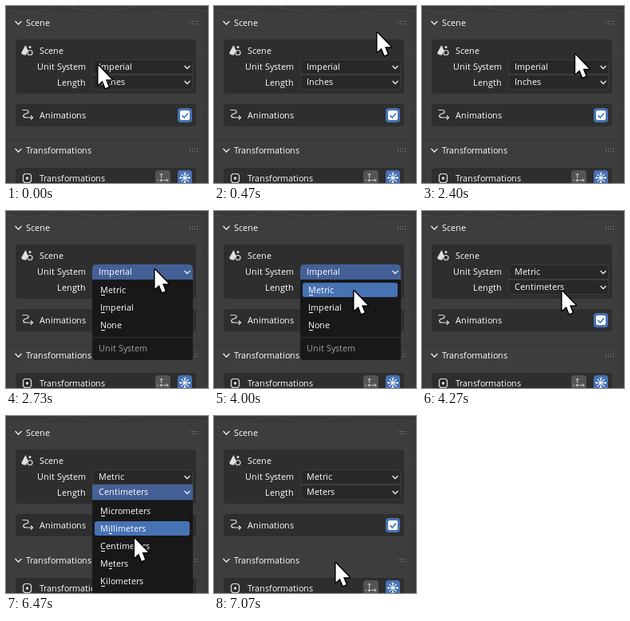
Recreate the animation shown at these times as an HTML page with a canvas. Size 253 by 222 pixels, loop 8000 ms.

```html
<!DOCTYPE html>
<html>
<head>
<meta charset="utf-8">
<style>
html, body { margin: 0; width: 100%; height: 100%; overflow: hidden; background: #393939; }
canvas { display: block; }
</style>
</head>
<body>
<canvas id="stage" width="253" height="222"></canvas>
<script>
const c = document.getElementById('stage').getContext('2d');
const LOOP = 8000, TICK = 1000 / 15;
const BLUE = '#4772b3', TEXT = '#fff', ICON = '#e0e0e0';

// Pointer moves: first tick, last tick, from, to
const moves = [
  [0, 7, [115, 74], [204, 33]],
  [28, 41, [204, 33], [186, 73]],
  [52, 60, [186, 73], [175, 100]],
  [92, 101, [175, 100], [152, 184]]
];
const unitMenu = { top: 86, bottom: 187, first: 99, items: [['Metric', 0], ['Imperial', 0], ['None', 0]], title: 'Unit System' };
const lengthMenu = {
  top: 106, bottom: 240, first: 119,
  items: [['Micrometers', 0], ['Millimeters', 1], ['Centimeters', 0], ['Meters', 1], ['Kilometers', 0]]
};

function box(x, y, w, h, r, fill, line) {
  c.beginPath();
  c.roundRect(x, y, w, h, r);
  c.fillStyle = fill;
  c.fill();
  if (line) { c.strokeStyle = line; c.lineWidth = 1; c.stroke(); }
}

c.font = '10.75px "Open Sans", "Noto Sans", sans-serif';
const measure = s => c.measureText(s).width;

// Glyphs advance by whole pixels, kerning included
const advance = (s, i) => Math.round(measure(s.slice(i, i + 2)) - measure(s.slice(i + 1, i + 2)));
const widthTo = (s, end) => [...s.slice(0, end)].reduce((sum, _, i) => sum + advance(s, i), 0);

function text(s, x, y, color = TEXT) {
  c.fillStyle = color;
  [...s].forEach((ch, i) => {
    c.fillText(ch, x, y);
    x += advance(s, i);
  });
}

const label = (s, y) => text(s, 100 - widthTo(s, s.length), y);

function line(d, color = ICON, width = 1.2) {
  c.strokeStyle = color;
  c.lineWidth = width;
  c.stroke(new Path2D(d));
}

function shape(d, color = ICON) {
  c.fillStyle = color;
  c.fill(new Path2D(d));
}

function dot(x, y, r, color = ICON) {
  c.beginPath();
  c.arc(x, y, r, 0, 7);
  c.fillStyle = color;
  c.fill();
}

function header(title, y) {
  line(`M11.5 ${y - 2}l4 4 4-4`, '#eee', 1.3);
  text(title, 25, y + 4);
  c.fillStyle = '#8c8c8c';
  for (let i = 0; i < 8; i++) c.fillRect(230 + (i % 4) * 3, y - 2 + (i >> 2) * 3, 1, 1);
}

function field(value, y, open, radii) {
  box(108.5, y + .5, 125, 18, radii, open ? '#446097' : '#282828', open ? '#446097' : '#3d3d3d');
  text(value, 116, y + 13);
  line(`M223.5 ${y + 8}l3.5 3.5 3.5-3.5`, '#eee', 1.3);
}

function snowflake(x, y) {
  for (let i = 0; i < 8; i++) {
    c.save();
    c.translate(x, y);
    c.rotate(i * Math.PI / 4);
    line(i % 2 ? 'M0 0V-6.5' : 'M0 0V-7M-1.5-6L0-4.5 1.5-6', '#fff', 1);
    c.restore();
  }
}

function panel() {
  c.fillStyle = '#393939';
  c.fillRect(0, 0, 253, 222);
  box(3, 8, 244, 159, 3, '#3d3d3d');
  box(3, 169, 244, 60, 3, '#3d3d3d');
  line('M0 5Q35 12 65 0M75 0Q120 13 165 0M185 8Q220 2 253 7M247 60L253 54M247 128L253 136M0 95L3 92', 'rgba(255,255,255,.07)', 1);
  header('Scene', 21);
  header('Transformations', 181);
  box(12, 42, 226, 68, 4, '#2e2e2e');
  box(12, 123, 226, 28, 4, '#2e2e2e');
  box(12, 203, 226, 30, 4, '#2e2e2e');

  shape('M24.5 49L28 57Q25 59 25.5 61.5Q21 62 19 59Z');
  c.beginPath();
  c.arc(30, 58.5, 3, 0, 7);
  c.strokeStyle = ICON;
  c.lineWidth = 1.2;
  c.stroke();
  dot(30, 51.5, 1.5);
  text('Scene', 42, 60);
  label('Unit System', 80);
  label('Length', 100);

  line('M20.5 130.5H24C30 130.5 29 134 25 135C20 137 21 140 26 140H33.5M31 137.5L33.5 140 31 142.5');
  text('Animations', 42, 141);
  box(215, 128, 18, 18, 4, BLUE);
  box(218, 131, 12, 12, 2, '#fff');
  line('M220.5 137l2.7 3 4.8-5.5', BLUE, 1.8);

  line('M23.5 210.5H29.5L31.5 212.5V219.5L29.5 221.5H23.5L21.5 219.5V212.5Z');
  dot(26.5, 216, 1.7);
  text('Transformations', 42, 220);
  box(187, 206, 19, 19, 4, '#545454');
  line('M194.5 210V216M192.5 212l2-2 2 2M197 218.5H203M201 216.5l2 2-2 2', '#ccc', 1);
  dot(194.5, 218.5, 1.5, '#ccc');
  dot(190.5, 218.5, .8, '#ccc');
  box(215, 206, 18, 19, 4, BLUE);
  snowflake(224, 215.5);
}

function menu({ top, bottom, first, items, title }, tipY) {
  box(108, top, 126, bottom - top, [0, 0, 4, 4], '#181818');
  const active = Math.floor((tipY - first + 11) / 22);
  items.forEach(([name, key], i) => {
    const y = first + i * 22;
    if (i === active) box(111, y - 9, 119, 18, 3, BLUE);
    text(name, 118, y + 4);
    c.fillRect(119 + widthTo(name, key), y + 6, key ? 4 : 5, 1);
  });
  if (title) {
    c.fillStyle = '#303030';
    c.fillRect(109, 158, 125, 1);
    text(title, 116, 176, '#a0a0a0');
  }
}

function tip(tick) {
  let pos = moves[0][2];
  for (const [a, b, from, to] of moves) {
    if (tick < a) break;
    const p = Math.min(1, (tick - a) / (b - a));
    const e = p * (1.3 - .3 * p);
    pos = from.map((v, i) => v + (to[i] - v) * e);
  }
  return pos;
}

function pointer([x, y]) {
  c.save();
  c.translate(x, y);
  c.lineJoin = 'round';
  const arrow = 'M.5.5V24.5L5.8 19.7 9.5 29 13.6 27.2 10 18.2H17.5Z';
  line(arrow, '#000', 3);
  shape(arrow, '#fff');
  c.restore();
}

function draw(now) {
  const tick = Math.floor((now % LOOP + 5) / TICK);
  const unitOpen = tick >= 41 && tick < 64;
  const lengthOpen = tick >= 82 && tick < 106;
  const metric = tick >= 64;
  const length = !metric ? 'Inches' : tick < 106 ? 'Centimeters' : 'Meters';
  panel();
  field(metric ? 'Metric' : 'Imperial', 67, unitOpen, [4, 4, 0, 0]);
  field(length, 86, lengthOpen, lengthOpen ? 0 : [0, 0, 4, 4]);
  const hoverY = tip(tick - 1)[1];
  if (unitOpen) menu(unitMenu, hoverY);
  if (lengthOpen) menu(lengthMenu, hoverY);
  pointer(tip(tick));
}

const start = performance.now();
function frame() {
  draw(performance.now() - start);
  requestAnimationFrame(frame);
}
frame();
</script>
</body>
</html>
```
